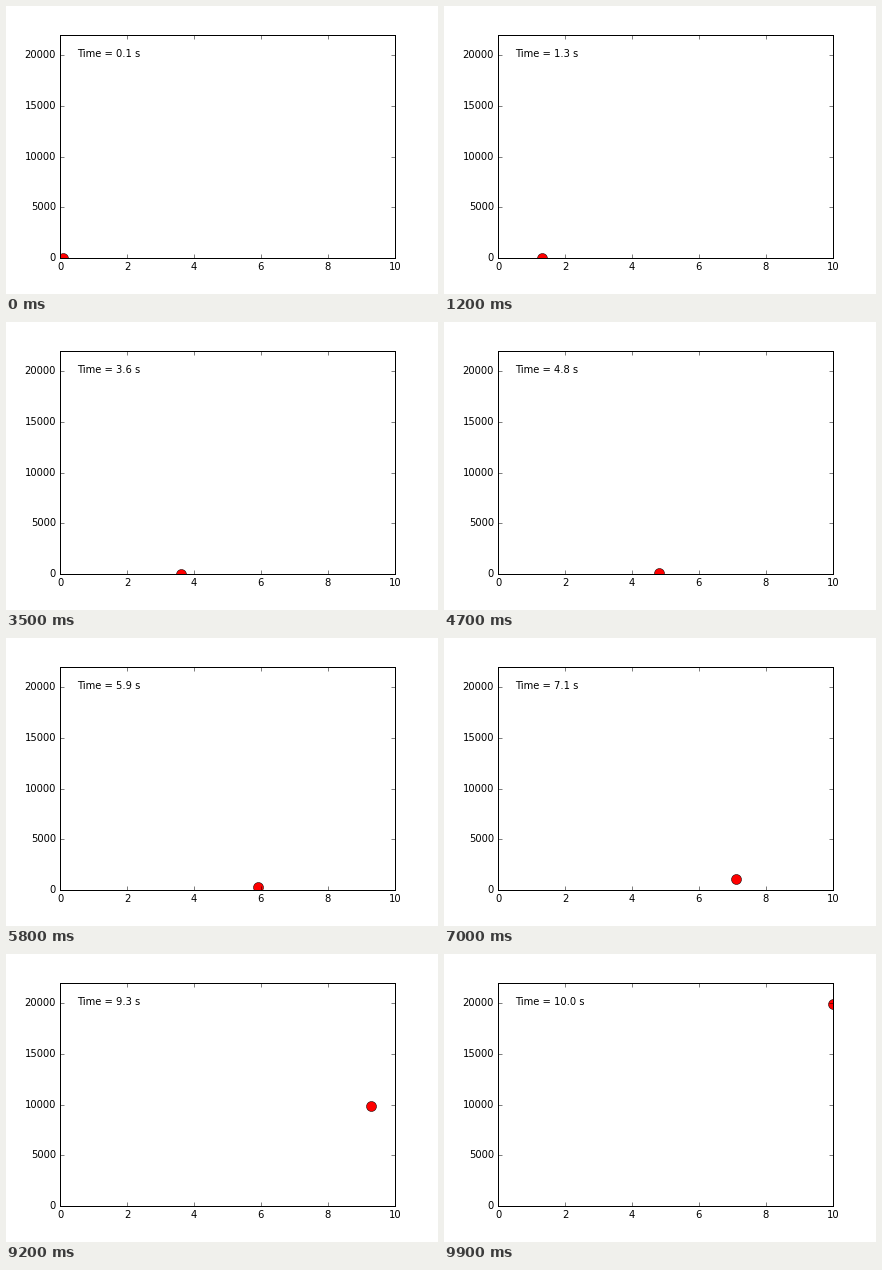
A matplotlib script for the animation above (10 s loop, 432x288 px).

```python
import numpy as np
import matplotlib.pyplot as plt
from matplotlib.animation import FuncAnimation

plt.style.use("classic")
plt.rcParams.update({
    "font.family": "DejaVu Sans",
    "font.size": 10,
    "figure.facecolor": "white",
    "savefig.dpi": "figure",
})

FRAMES = 100
STEP = 0.1  # seconds per frame

fig = plt.figure(figsize=(6, 4), dpi=72)
ax = fig.add_axes([0.125, 0.125, 0.775, 0.775])
ax.set_xlim(0, 10)
ax.set_ylim(0, 22000)
ax.set_xticks(range(0, 11, 2))
ax.set_yticks(range(0, 20001, 5000))

ball, = ax.plot([], [], "ro", markersize=10)
label = ax.text(0.05, 0.9, "", transform=ax.transAxes)


def update(i):
    """Move the ball along an exponential curve and update the clock."""
    t = (i + 1) * STEP
    ball.set_data([t], [np.exp(i * STEP)])
    label.set_text(f"Time = {t:.1f} s")
    return ball, label


anim = FuncAnimation(fig, update, frames=FRAMES, interval=1000 * STEP,
                     repeat=True, repeat_delay=0, blit=False)
plt.show()
```
